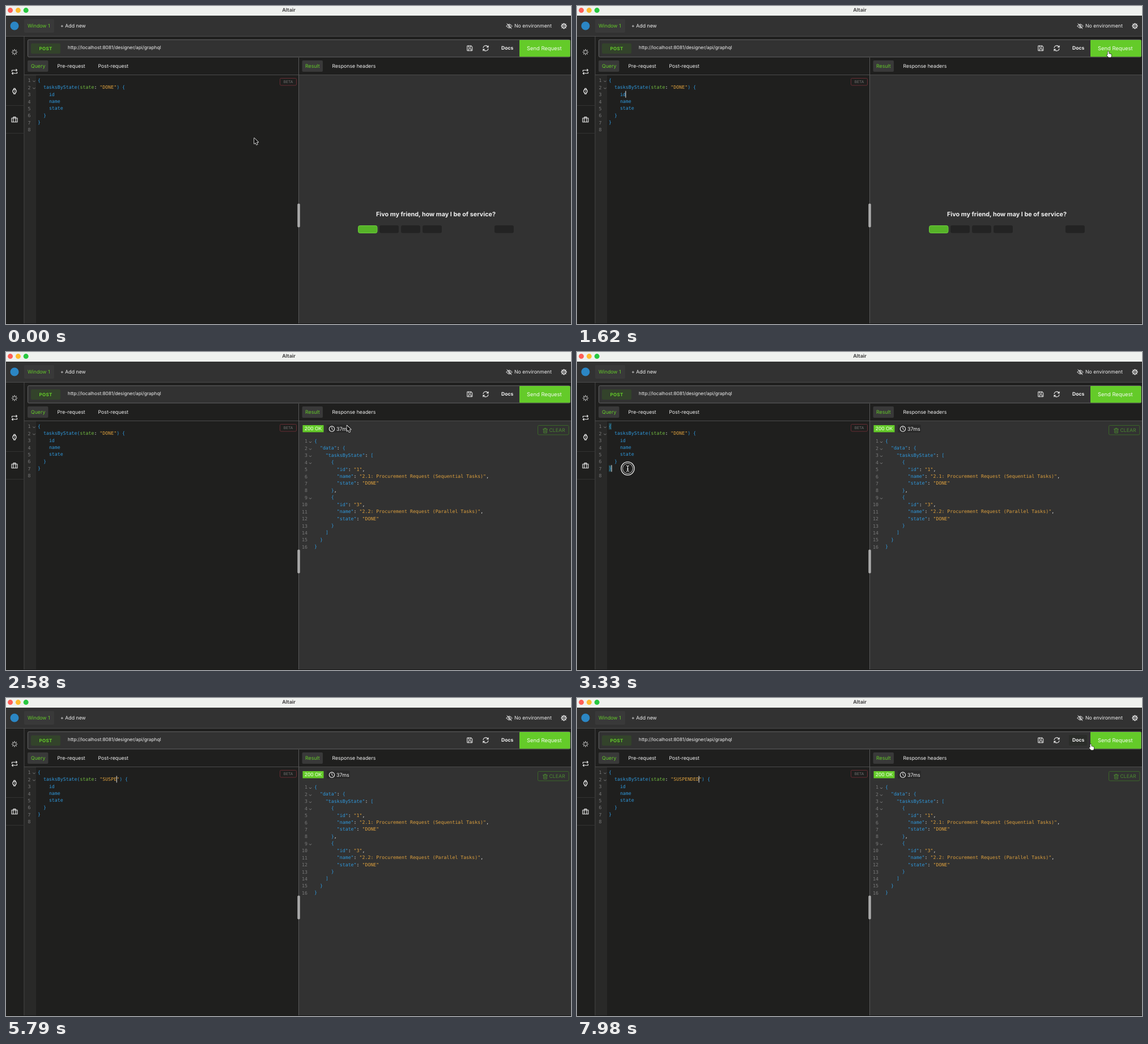
These frames come from a looping animation (997 px wide and 561 px high, 8 s). An HTML page with a canvas:

```html
<!DOCTYPE html>
<html lang="en">
<head>
<meta charset="utf-8">
<title>API client</title>
<style>
html, body { margin: 0; width: 100%; height: 100%; overflow: hidden; background: #1f1f1e; }
canvas { display: block; }
</style>
</head>
<body>
<canvas id="stage" width="997" height="561"></canvas>
<script>
const ctx = document.getElementById('stage').getContext('2d');
ctx.textRendering = 'geometricPrecision';

const LOOP = 8000, CHAR = 4.97, LINE = 12.42;
const UI = 'Inter, sans-serif', MONO = '"DejaVu Sans Mono", monospace';
const GREEN = '#64cb29', BLUE = '#2f98dc', ORANGE = '#dda03e', WHITE = '#f0f0f0';
const DARK = '#1f1f1e', PANEL = '#323232', EDGE = '#4b4b4b', CHIP = '#393939';

const LOAD_AT = 2130, RESULT_AT = 2220, SELECT_AT = 4140;
const KEYS = [5000, 5180, 5360, 5540, 5720, 5900, 6080, 6300, 6660];
const PRESSES = [[2040, 2130], [3300, 3450], [4080, 4300]];

const RESULT = `{
  "data": {
    "tasksByState": [
      {
        "id": "1",
        "name": "2.1: Procurement Request (Sequential Tasks)",
        "state": "DONE"
      },
      {
        "id": "3",
        "name": "2.2: Procurement Request (Parallel Tasks)",
        "state": "DONE"
      }
    ]
  }
}`.split('\n');

const easeIn = p => p * p;
const easeOut = p => 1 - (1 - p) ** 2;
const smooth = p => p * p * (3 - 2 * p);

// start, end, from, to, easing
const MOVES = [
  [630, 960, [438, 233], [774, 154], easeIn],
  [960, 1400, [774, 154], [936.5, 80], easeOut],
  [2250, 3020, [936.5, 80], [89.5, 205.5], smooth],
  [3420, 3870, [89.5, 205.5], [182.5, 140], smooth],
  [7160, 8040, [182.5, 140], [915, 80.4], smooth]
];

function rect(x, y, w, h, color, r = 0, border) {
  ctx.beginPath();
  ctx.roundRect(x, y, w, h, r);
  if (color) { ctx.fillStyle = color; ctx.fill(); }
  if (border) { ctx.strokeStyle = border; ctx.lineWidth = 1; ctx.stroke(); }
}

function disc(x, y, r, color) {
  ctx.beginPath();
  ctx.arc(x, y, r, 0, 7);
  ctx.fillStyle = color;
  ctx.fill();
}

function ring(x, y, r, color, width) {
  ctx.beginPath();
  ctx.arc(x, y, r, 0, 7);
  ctx.strokeStyle = color;
  ctx.lineWidth = width;
  ctx.stroke();
}

function text(str, x, y, color = WHITE, size = 8.75, weight = 400, align = 'left', family = UI) {
  ctx.font = `${weight} ${size}px ${family}`;
  ctx.textAlign = align;
  ctx.fillStyle = color;
  ctx.fillText(str, x, y + size * .36);
}

function icon(x, y, d, color = WHITE, width = 1, fill) {
  const path = new Path2D(d);
  ctx.save();
  ctx.translate(x, y);
  ctx.lineCap = ctx.lineJoin = 'round';
  ctx.strokeStyle = color;
  ctx.lineWidth = width;
  ctx.stroke(path);
  if (fill) { ctx.fillStyle = fill; ctx.fill(path); }
  ctx.restore();
}

function codeLine(str, x, y) {
  const tokens = /"[^"]*"|\w+|[{}()\[\]:,]/g;
  for (const m of str.matchAll(tokens)) {
    const word = m[0], isKey = str[m.index + word.length] === ':';
    let color = BLUE;
    if (word[0] === '"') color = isKey ? BLUE : ORANGE;
    else if (/[:,]/.test(word)) color = WHITE;
    else if (isKey) color = '#72bd41';
    text(word, x + m.index * CHAR, y, color, 8.26, 400, 'left', MONO);
  }
}

function codeBlock(lines, x, y, numberX, foldX) {
  lines.forEach((str, i) => {
    const cy = y + i * LINE;
    text(i + 1, numberX, cy + .5, '#797979', 8.26, 400, 'right', MONO);
    if (/[{[]$/.test(str)) icon(foldX, cy + 2, 'M-1.8-.8L0 1L1.8-.8', '#8a8a8a', .9);
    codeLine(str, x, cy);
  });
}

function titleBar() {
  rect(0, 0, 997, 17, '#eff1ee');
  ['#ff5f57', '#febc2e', '#28c840'].forEach((c, i) => disc(7.6 + i * 13.8, 7.6, 4.5, c));
  text('Altair', 499, 7.3, '#454545', 8.8, 700, 'center');
}

function header() {
  rect(0, 17, 997, 36, PANEL);
  rect(0, 53, 997, 1, EDGE);
  disc(15, 35, 7.5, '#2b86c4');
  rect(32, 23, 53, 24, CHIP, 2);
  text('Window 1', 38, 35, GREEN);
  text('+ Add new', 96, 35);
  icon(888, 35.5, 'M-5 0Q0-7 5 0Q0 7-5 0M-4-4.5L4 4.5M1.6 0A1.6 1.6 0 1 1-1.6 0A1.6 1.6 0 1 1 1.6 0', WHITE, 1);
  text('No environment', 897, 35);
  ring(984.5, 35.3, 3.5, WHITE, 1.2);
  ring(984.5, 35.3, 1.4, WHITE, 1);
  for (let i = 0; i < 8; i++) {
    const a = i * Math.PI / 4, c = Math.cos(a), s = Math.sin(a);
    icon(984.5, 35.3, `M${3.8 * c} ${3.8 * s}L${4.6 * c} ${4.6 * s}`, WHITE, 1.6);
  }
}

function sidebar() {
  rect(31.5, 54, 1, 507, EDGE);
  rect(0, 175, 32, 1, PANEL);
  rect(0, 224, 32, 1, PANEL);
  for (let i = 0; i < 8; i++) {
    const a = i * Math.PI / 4, c = Math.cos(a), s = Math.sin(a);
    icon(15, 81.3, `M${2.6 * c} ${2.6 * s}L${4.7 * c} ${4.7 * s}`, WHITE, 1.1);
  }
  icon(15, 116, 'M-4.5-.5V-2.8H4.5M2.8-4.5L4.5-2.8L2.8-1.1M4.5.5V2.8H-4.5M-2.8 1.1L-4.5 2.8L-2.8 4.5', WHITE, 1.1);
  ring(15, 150.3, 3.2, WHITE, 1.2);
  icon(15, 150.3, 'M-1.7-3L-1.3-5H1.3L1.7-3M-1.7 3L-1.3 5H1.3L1.7 3M0-1V.4H.8', WHITE, 1);
  icon(15, 200.5, 'M-5-2.8H5V4.2H-5ZM-2-2.8V-4.6H2V-2.8M-2-2.8V4.2M2-2.8V4.2', WHITE, 1.1);
}

function urlBar(loading, docsHover) {
  rect(38.5, 59.5, 957, 30.5, PANEL, 2, loading ? GREEN : '#626262');
  rect(44, 66, 52, 18, '#33432b', 2);
  ctx.letterSpacing = '.3px';
  text('POST', 58.5, 75.3, GREEN, 8, 700);
  ctx.letterSpacing = '0px';
  text('http://localhost:8081/designer/api/graphql', 109, 73.5, WHITE, 8.27);
  const dx = loading ? 18 : 0;
  icon(818.5 + dx, 74.5, 'M-4.3-4.3H2.6L4.3-2.6V4.3H-4.3ZM-2.3-4.3V-1.6H1.8V-4.3M-2.4 4.3V1H2.4V4.3', WHITE, 1);
  icon(846.5 + dx, 74.5, 'M-4.4-.7A4.4 4.4 0 0 1 4-2M4.6-4.5V-1.7H1.8M4.4.7A4.4 4.4 0 0 1-4 2M-4.6 4.5V1.7H-1.8', WHITE, 1.1);
  if (docsHover) rect(868, 65, 32, 19, '#2b2d2a', 2);
  text('Docs', 874 + dx, 74.3, WHITE, 8.6, 700);
  if (loading) {
    rect(924, 60, 71.5, 29.5, '#83d557', 1);
    text('Loading...', 937, 74.5, '#c6ecb3', 9.4);
  } else {
    rect(906, 60, 89.5, 29.5, GREEN, 1);
    text('Send Request', 919, 74.5, '#f4fbf0', 9.4);
  }
}

function panes() {
  rect(33, 122, 20, 439, '#292928');
  rect(517, 122, 480, 439, PANEL);
  rect(32, 121, 965, 1, EDGE);
  rect(516, 91, 1, 470, '#585858');
  rect(38, 96, 36.5, 20, CHIP, 2);
  text('Query', 44, 106, GREEN);
  text('Pre-request', 90.5, 106);
  text('Post-request', 162.5, 106);
  rect(522.5, 96, 36.5, 20, CHIP, 2);
  text('Result', 528, 106, GREEN, 8.8);
  text('Response headers', 575.5, 106);
}

function loaderHint(alpha) {
  ctx.save();
  ctx.globalAlpha = alpha;
  rect(517, 122, 50, 70, '#453331');
  disc(499, 125.5, 18, '#382a29');
  ring(499, 125.5, 18, '#523230', 1);
  rect(471, 164, 58, 15, '#2c2c2b', 2);
  text('Cancel', 499, 172, '#555', 8.75, 400, 'center');
  ctx.restore();
}

function query(t) {
  const typed = KEYS.filter(k => k <= t).length;
  const state = typed ? 'SUSPENDED'.slice(0, typed) : 'DONE';
  const x = 56, y = 130.8;
  if (t >= 3300 && t < 4080) {
    rect(x, y - 5.5, CHAR, 11.5, '#25484f');
    rect(x, y + 6 * LINE - 5.5, CHAR, 11.5, '#25484f');
  }
  codeBlock(['{', `  tasksByState(state: "${state}") {`, '    id', '    name', '    state', '  }', '}', ''], x, y, 43.5, 49.5);
  if (t >= SELECT_AT && !typed) {
    const sx = x + 23 * CHAR, sy = y + LINE;
    rect(sx, sy - 6, 4 * CHAR, 12, '#dcdce4');
    text('DONE', sx, sy, '#a9865a', 8.26, 400, 'left', MONO);
  }

  let col, row, since;
  if (t < LOAD_AT) [col, row, since] = [6, 2, 210];
  else if (t >= 3300 && t < 4080) [col, row, since] = [1, 6, 3300];
  else if (typed) [col, row, since] = [23 + typed, 1, KEYS[typed - 1]];
  if (since <= t && (t - since) % 1200 < 600)
    rect(x + col * CHAR - .4, y + row * LINE - 5.8, 1, 11.8, '#e8e8e8');

  rect(483.5, 127.5, 29, 12.5, null, 2, '#652c32');
  text('BETA', 498, 134, '#686868', 6.5, 500, 'center');
}

function emptyResult() {
  text('Fivo my friend, how may I be of service?', 758.5, 366.8, WHITE, 10.8, 700, 'center');
  rect(621.5, 387.5, 33.5, 13, '#56b328', 3, '#6dcc3e');
  for (const x of [659, 697, 735, 862]) rect(x, 387, 34, 13.5, '#232323', 3);
}

function result() {
  rect(523.5, 129, 37, 12.5, GREEN);
  text('200 OK', 542, 135.2, '#f8fff4', 8.5, 400, 'center');
  rect(566, 128, 41, 14, '#292929', 2);
  ring(575, 135.6, 4.7, WHITE, 1.1);
  icon(575, 135.6, 'M0-2.7V0L1.7 1.4', WHITE, 1);
  text('37ms', 583, 135.3, WHITE, 9);
  rect(938.5, 129.5, 54.5, 16.5, null, 2, '#3a6628');
  icon(951.5, 138.7, 'M-4-2.6H4M-1.5-2.6V-4.2H1.5V-2.6M-3.1-2.6L-2.7 4.2H2.7L3.1-2.6M-1-.5V2.3M1-.5V2.3', '#4c8a31', .9);
  text('CLEAR', 958.5, 138, '#4c8a31', 8.7);
  codeBlock(RESULT, 544, 157, 532, 537);
}

function pointerAt(t) {
  let pos = MOVES[0][2];
  for (const [start, end, from, to, ease] of MOVES) {
    if (t < start) break;
    const p = ease(Math.min(1, (t - start) / (end - start)));
    pos = from.map((v, i) => v + (to[i] - v) * p);
  }
  return pos;
}

function pointer(t, [x, y]) {
  if (t >= 4990 && t < 7160) return;
  if (PRESSES.some(([a, b]) => t >= a && t < b)) {
    disc(x, y, 12, 'rgba(30,30,30,.45)');
    ring(x, y, 11.6, '#f2f2f2', 1.3);
    ring(x, y, 9, 'rgba(235,235,235,.85)', 1);
  }
  const overQuery = x > 53 && x < 514 && y > 122 && y < 225;
  const overResult = t >= RESULT_AT && x > 540 && y > 150 && y < 350;
  const overButton = x > 866 && y > 60 && y < 91;
  if (overButton) {
    icon(x, y, 'M0 1.2Q0 0 1 0T2 1.2V4.2Q6 4 6.5 6V8Q6.5 9 5.5 10.5H1.5L-1.8 6.8Q-2 5.4 0 6.4Z', '#111', 1.2, '#fff');
  } else if (overQuery || overResult) {
    const beam = 'M-2-5Q0-5 0-3.5V3.5Q0 5-2 5M2-5Q0-5 0-3.5M0 3.5Q0 5 2 5M-1 1H1';
    icon(x, y, beam, '#222', 2.2);
    icon(x, y, beam, '#fff', 1);
  } else {
    icon(x, y, 'M0 0V10L2.3 7.9L4 11.7L5.8 10.9L4.1 7.2H7.3Z', '#f4f4f4', 1.5, '#111');
  }
}

function draw(t) {
  const loading = t >= LOAD_AT && t < RESULT_AT;
  const pos = pointerAt(t);
  rect(0, 0, 997, 561, DARK);
  titleBar();
  header();
  sidebar();
  urlBar(loading, t > 7160 && pos[0] > 868 && pos[0] < 920);
  panes();
  if (loading) loaderHint(Math.min(1, (t - LOAD_AT) / 60));
  query(t);
  if (t < RESULT_AT) emptyResult();
  else result();
  rect(514.3, 348.5, 4.5, 42, '#aaa', 2);
  rect(0, 560, 997, 1, '#171717');
  pointer(t, pos);
}

const begin = performance.now();
function tick() {
  draw((performance.now() - begin) % LOOP);
  requestAnimationFrame(tick);
}
tick();
</script>
</body>
</html>
```
